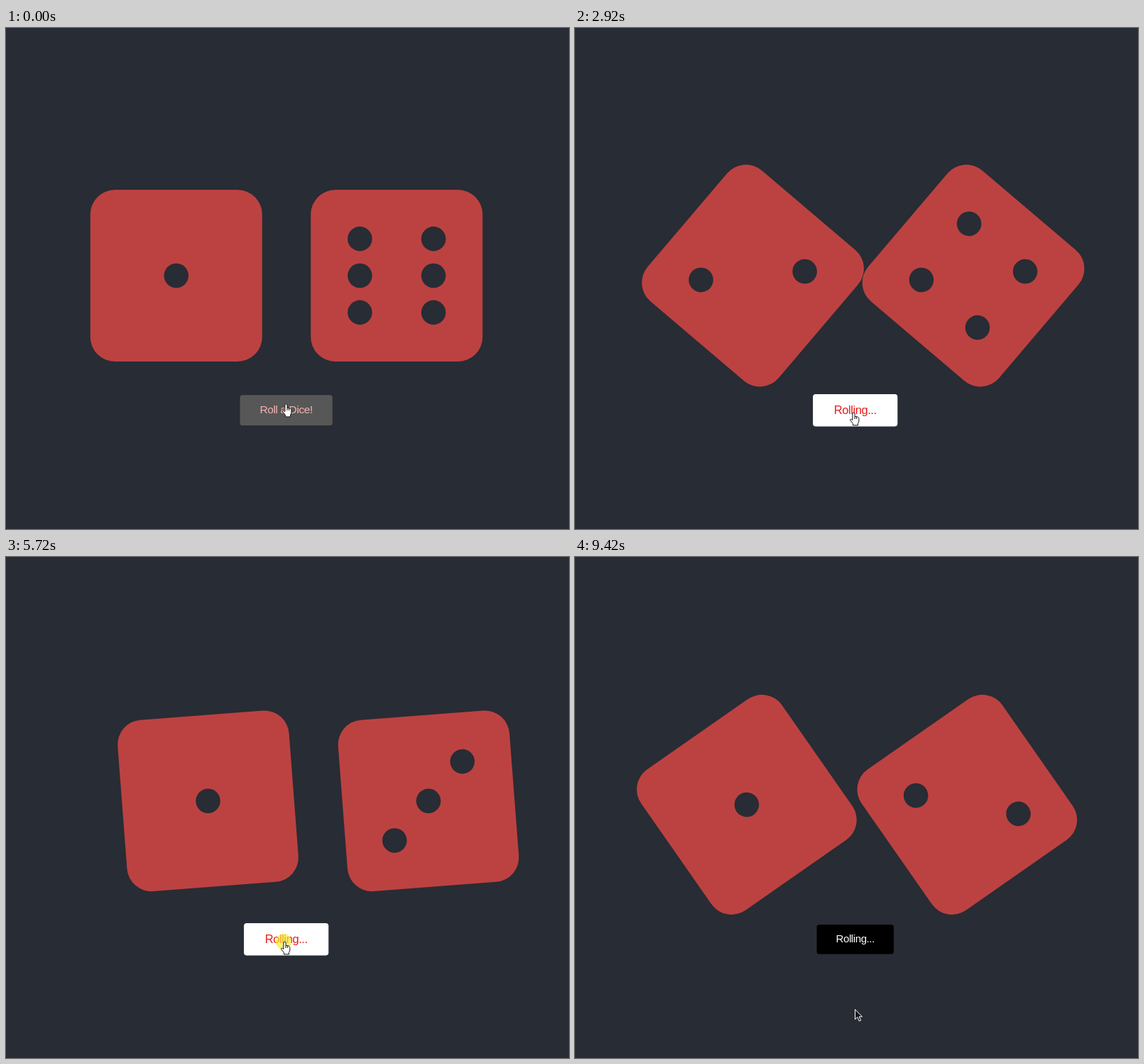
Recreate the animation shown at these times as an HTML page with a canvas. Size 793x706 px, loop 9.52 s.

```html
<!DOCTYPE html>
<html lang="en">
<head>
<meta charset="utf-8">
<title>Roll a Dice</title>
<style>
html, body { margin: 0; width: 100%; height: 100%; overflow: hidden; background: #282c34; }
canvas { display: block; }
</style>
</head>
<body>
<canvas id="stage" width="793" height="706"></canvas>
<script>
const ctx = document.getElementById('stage').getContext('2d');
const LOOP = 9520, ROLL_TIME = 995, FADE = 500, HALO_TIME = 300;
const BACK = '#282c34', RED = '#bc4241';
const DIE = 242, EM = DIE * 512 / 448, PIP_GAP = DIE * 96 / 448;

// Faces are left and right die, while rolling and once settled.
const ROLLS = [
  { press: 560, start: 563, during: '43', after: '25' },
  { press: 2560, start: 2580, during: '24', after: '61' },
  { press: 4121, start: 4121, during: '52', after: '35' },
  { press: 5420, start: 5470, during: '13', after: '54' },
  { press: 6820, start: 6877, during: '26', after: '33' },
  { press: 8720, start: 8767, during: '12', after: '12' }
];

// Times at which the pointer enters and leaves the button.
const HOVERS = [[-110, 850], [2330, 7180], [8455, 8930]];

// Pointer stops: time, x, y.
const POINTER = [
  [0, 394, 529], [650, 394, 529], [1100, 392, 598], [2050, 392, 598], [2450, 392, 546],
  [2800, 392, 541], [7020, 392, 541], [7120, 427, 549], [7700, 400, 646], [8100, 400, 646],
  [8550, 395, 546], [8820, 395, 546], [9420, 394, 637], [LOOP, 394, 637]
];

const HAND = new Path2D('M-1.6 11V1.5Q0-1 1.6 1.5V6Q7.4 6 7.4 9V13L6 16V18.4H-1V16L-5 11Q-5 8.5-1.6 11M1.6 6V9.5M4.2 6.3V9.5');
const ARROW = new Path2D('M0 0V14L3.3 11L5.8 16.5L8.2 15.5L5.7 10.3H10Z');

const mix = (a, b, p) => a + (b - a) * p;
const linear = p => p;

// cubic-bezier(.25, .1, .25, 1)
function ease(x) {
  if (x <= 0) return 0;
  if (x >= 1) return 1;
  let lo = 0, hi = 1, s;
  for (let i = 0; i < 24; i++) {
    s = (lo + hi) / 2;
    if (0.75 * s * (1 - s) + s ** 3 < x) lo = s; else hi = s;
  }
  return 0.3 * s * (1 - s) ** 2 + 3 * s * s * (1 - s) + s ** 3;
}

// Six quarter-turn keys: one hop up, then sideways swings that shrink by 5% each.
function wobbleKeys() {
  const keys = [[0, 0, 0, 0]];
  [5, 3, 3, 2, 1].forEach((tilt, i) => {
    const side = i % 2 ? 1 : -1, shift = side * (0.25 - 0.05 * i);
    keys.push([0.15 * (i + 1), i ? shift * DIE : 0, i ? 0 : shift * EM, 90 * i + side * tilt]);
  });
  return [...keys, [1, 0, 0, 360]];
}
const WOBBLE = wobbleKeys();

function sample(keys, t, easing) {
  const i = Math.max(1, keys.findIndex(k => k[0] >= t));
  const a = keys[i - 1], b = keys[i];
  const p = easing((t - a[0]) / (b[0] - a[0]));
  return a.slice(1).map((v, j) => mix(v, b[j + 1], p));
}

const pointerAt = t => sample(POINTER, t, linear);

// The picture advances in 100 ms steps, two of which last 10 ms longer.
function stepTime(ms) {
  const extra = ms < 1010 ? 0 : ms < 2420 ? 10 : 20;
  return Math.floor((ms - extra) / 100) * 100 + extra;
}

function hoverAmount(t) {
  const [enter, leave] = HOVERS.filter(h => h[0] <= t).pop();
  return t < leave ? ease((t - enter) / FADE) : 1 - ease((t - leave) / FADE);
}

function disc(x, y, r, color) {
  ctx.fillStyle = color;
  ctx.beginPath();
  ctx.arc(x, y, r, 0, 2 * Math.PI);
  ctx.fill();
}

function box(w, h, r, color) {
  ctx.fillStyle = color;
  ctx.beginPath();
  ctx.roundRect(-w / 2, -h / 2, w, h, r);
  ctx.fill();
}

function pips(face) {
  const spots = [];
  if (face % 2) spots.push([0, 0]);
  if (face > 1) spots.push([-1, -1], [1, 1]);
  if (face > 3) spots.push([1, -1], [-1, 1]);
  if (face > 5) spots.push([-1, 0], [1, 0]);
  return spots;
}

function drawDie(cx, face, [dx, dy, angle]) {
  ctx.save();
  ctx.translate(cx + dx, 349 + dy);
  ctx.rotate(angle * Math.PI / 180);
  box(DIE, DIE, DIE / 7, RED);
  for (const [x, y] of pips(face)) disc(x * PIP_GAP, y * PIP_GAP, DIE / 14, BACK);
  ctx.restore();
}

function drawButton(label, hover) {
  const bg = 255 * hover, tint = mix(255, 28, hover), size = 1 + 0.1 * hover;
  ctx.save();
  ctx.translate(394.7, 538.7);
  ctx.scale(size, size);
  ctx.font = '15px "Liberation Sans", Arial, sans-serif';
  ctx.letterSpacing = '-0.4px';
  ctx.textAlign = 'center';
  box(ctx.measureText(label).width + 54, 41.4, 3.5, `rgb(${bg},${bg},${bg})`);
  ctx.fillStyle = `rgb(${mix(255, 232, hover)},${tint},${tint})`;
  ctx.fillText(label, 0, 4.4);
  ctx.restore();
}

function drawHalo(t, x, y) {
  const roll = ROLLS.find(r => t >= r.press && t < r.start + HALO_TIME);
  if (!roll) return;
  const [px, py] = pointerAt(roll.press);
  if (Math.hypot(x - px, y - py) < 10) disc(x - 1, y + 1, 11, 'rgba(245,235,45,.7)');
}

function drawPointer(x, y, isHand) {
  const shape = isHand ? HAND : ARROW;
  ctx.save();
  ctx.translate(x + 0.5, y + 0.5);
  ctx.lineJoin = 'round';
  ctx.fillStyle = isHand ? '#fff' : '#16181c';
  ctx.strokeStyle = isHand ? '#111' : '#fff';
  ctx.fill(shape);
  ctx.stroke(shape);
  ctx.restore();
}

function draw(t) {
  const roll = ROLLS.filter(r => r.start <= t).pop();
  const rolling = !!roll && t - roll.start < ROLL_TIME;
  const faces = !roll ? '16' : rolling ? roll.during : roll.after;
  const pose = rolling ? sample(WOBBLE, (t - roll.start) / 1000, ease) : [0, 0, 0];
  const [x, y] = pointerAt(t);

  ctx.fillStyle = BACK;
  ctx.fillRect(0, 0, 793, 706);
  drawDie(239.8, +faces[0], pose);
  drawDie(550.3, +faces[1], pose);
  drawButton(rolling ? 'Rolling...' : 'Roll a Dice!', hoverAmount(t));
  drawHalo(t, x, y);
  drawPointer(x, y, HOVERS.some(([enter, leave]) => t >= enter && t < leave));
}

const began = performance.now();
function tick() {
  draw(stepTime((performance.now() - began) % LOOP));
  requestAnimationFrame(tick);
}
tick();
</script>
</body>
</html>
```
